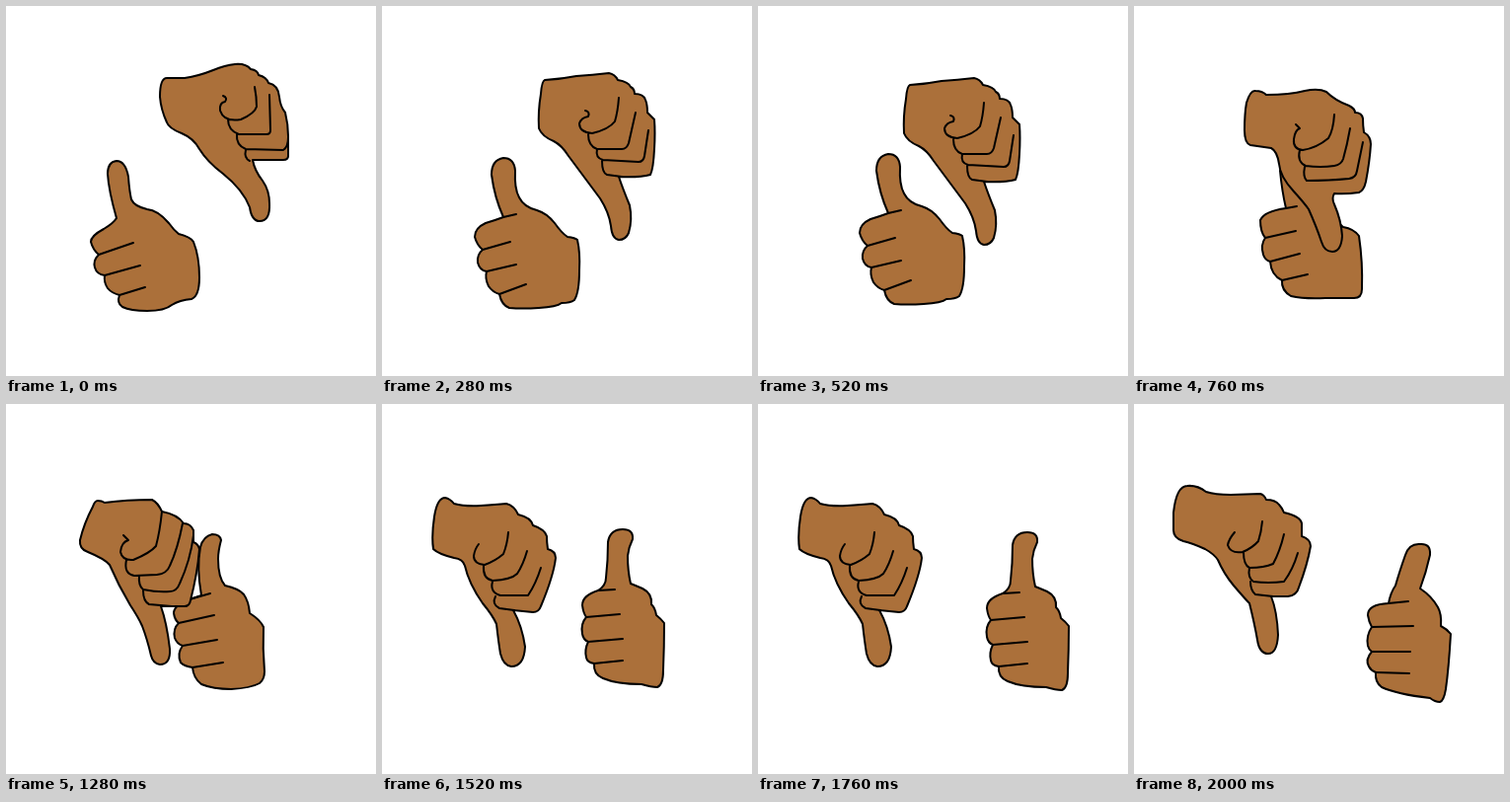
Animation, 375 px wide and 375 px high, one loop 2240 ms. Source, as an HTML page without scripts:

```html
<!DOCTYPE html>
<html lang="en">
<head>
<meta charset="utf-8">
<title>Thumbs up, thumbs down</title>
<style>
html, body { margin: 0; width: 100%; height: 100%; overflow: hidden; background: #fff; }
svg { display: block; width: 100%; height: 100%; }
path { fill: #ab703a; stroke: #000; stroke-width: 2; stroke-linecap: round; stroke-linejoin: round; }
.line { fill: none; }
.pose { visibility: hidden; animation: short 2240ms step-end infinite; animation-delay: calc(var(--at) * 1ms - 2240ms); }
.long { animation-name: long; }
@keyframes short { 0% { visibility: visible; } 10.7143%, 100% { visibility: hidden; } }
@keyframes long { 0% { visibility: visible; } 12.5%, 100% { visibility: hidden; } }
</style>
</head>
<body>
<svg viewBox="0 0 375 375">
<defs>
  <!-- thumbs up -->
  <g id="up1">
    <path d="M112 157Q103 158 103 170Q104 187 112 215Q109 220 99 226Q86 233 86 239Q88 247 94 252Q88 258 90 265Q92 272 100 273Q99 280 103 286Q107 291 115 293Q112 301 118 305Q126 309 143 309Q161 309 168 303Q176 298 188 297Q196 294 196 275Q196 254 190 239Q187 234 175 231Q170 227 165 220Q154 207 143 206Q130 203 127 196Q125 187 124 173Q121 157 112 157Z"/>
    <path class="line" d="M94 252L129 240M100 273L136 263M115 293L141 285"/>
  </g>
  <g id="up2">
    <path d="M132 150Q120 152 120 167Q123 190 132 210Q124 213 114 216Q103 221 103 230Q105 238 111 243Q105 248 106 256Q108 264 115 265Q113 272 117 280Q121 286 128 288Q130 299 138 302Q151 303 168 302Q186 301 191 297Q200 297 204 294Q209 286 209 264Q210 246 207 233Q205 231 197 230Q191 226 184 216Q176 206 166 203Q153 200 148 190Q143 181 144 163Q143 150 132 150Z"/>
    <path class="line" d="M132 210L145 207M111 243L139 235M115 265L145 258M128 288L155 278"/>
  </g>
  <g id="up3">
    <path d="M148 167Q150 188 154 205Q132 208 128 217Q128 229 133 235Q128 242 131 252Q133 258 138 259Q139 273 150 278Q149 288 159 294Q172 297 194 296H223Q231 296 231 287Q232 260 228 233Q223 226 212 224L190 205L165 175Z"/>
    <path class="line" d="M154 205L165 203M133 235L164 228M138 259L168 251M150 278L176 272"/>
  </g>
  <g id="up4">
    <path d="M209 132Q200 134 197 145Q193 166 198 194L186 198Q170 204 170 212Q171 219 175 222Q169 228 171 237Q173 243 179 245Q173 253 177 262Q181 266 189 267Q190 278 198 284Q210 289 228 289Q248 288 257 283Q262 279 262 271Q260 248 261 226Q258 219 247 212Q246 200 241 193Q236 187 222 184Q215 176 215 157Q215 149 218 138Q217 132 209 132Z"/>
    <path class="line" d="M186 198L207 192M175 222L211 214M179 245L214 239M189 267L220 262"/>
  </g>
  <g id="up5">
    <path d="M244 127Q231 127 229 140Q229 159 227 176Q227 184 219 189Q203 194 203 204Q204 212 207 216Q201 223 203 233Q204 239 209 241Q205 249 207 257Q208 262 215 263Q214 274 224 278Q238 284 263 284Q273 287 279 287Q285 285 285 270Q286 246 286 222Q283 218 278 214Q277 207 273 203Q274 192 264 187Q257 184 252 182Q249 169 249 154Q250 145 254 137Q255 127 244 127Z"/>
    <path class="line" d="M219 189L236 188M207 216L241 213M209 241L244 238M215 263L244 260"/>
  </g>
  <g id="up6">
    <path d="M290 142Q279 141 275 153Q269 170 265 184Q260 191 258 202Q237 203 237 214Q238 221 241 226Q235 235 237 245Q238 249 241 251Q234 259 238 266Q240 270 245 272Q244 282 251 287Q266 294 300 298Q305 302 310 302Q314 301 316 289Q319 268 321 233Q317 228 311 225Q312 213 308 206Q302 195 290 187Q296 171 300 153Q301 141 290 142Z"/>
    <path class="line" d="M258 202L278 200M241 226L283 225M241 251H280M245 272L279 273"/>
  </g>

  <!-- thumbs down -->
  <g id="down1">
    <path d="M163 73Q172 73 181 73Q195 71 210 65Q222 60 232 59Q243 58 248 64Q255 65 256 70Q264 72 266 78Q276 80 277 92Q278 102 283 108Q286 120 286 132V152Q286 156 281 156H250Q252 167 260 177Q267 187 267 200Q268 218 257 218Q249 218 247 204Q240 186 220 170Q204 158 196 145Q190 134 178 129Q165 124 163 118Q157 105 156 92Q156 73 163 73Z"/>
    <path class="line" d="M252 82Q254 92 254 102Q252 109 238 115Q221 118 217 106Q216 98 222 97Q225 93 220 91M267 90L268 126Q268 130 264 130H236Q225 126 225 115M234 130Q233 141 243 145L281 146Q286 143 286 133M243 146Q241 154 247 157"/>
  </g>
  <g id="down2">
    <path d="M154 80Q171 79 186 76Q202 75 219 73Q225 74 228 80Q239 82 241 87Q245 89 245 94Q254 94 256 100Q258 105 258 113Q262 117 265 120Q266 133 265 150Q264 170 261 176Q250 179 229 178Q233 190 240 207Q243 222 239 235Q236 242 229 242Q222 241 221 228Q219 214 210 200L178 157Q171 146 163 142Q151 137 148 129Q147 112 150 94Q151 81 154 80Z"/>
    <path class="line" d="M229 98Q228 112 225 122Q219 130 202 134Q189 133 189 124Q191 118 198 117Q200 112 195 111M246 113L239 144Q237 150 232 150H207Q198 147 198 135M259 131L255 157Q254 163 249 163L213 161Q205 159 207 150M212 162Q212 174 217 176L232 178"/>
  </g>
  <g id="down3">
    <path d="M123 86Q130 86 134 90Q158 90 173 86Q187 83 195 87Q204 96 218 101Q224 104 224 108Q231 108 232 114Q232 121 233 128Q240 132 240 140Q239 157 235 178Q233 187 228 189Q214 191 203 190Q200 195 203 201Q210 217 211 233Q210 249 201 249Q193 249 190 239Q185 224 177 206Q172 199 162 188Q148 173 147 160Q145 147 139 144L118 141Q112 139 112 126Q112 109 114 98Q118 85 123 86Z"/>
    <path class="line" d="M203 110Q202 126 197 134Q185 144 171 146Q161 145 162 135Q163 126 168 124L164 120M219 124Q216 141 212 155Q210 161 203 162Q189 164 174 162Q165 158 168 146M232 138L226 167Q225 174 218 175Q198 177 175 177Q171 173 173 163"/>
  </g>
  <g id="down4">
    <path d="M93 98Q97 98 100 100Q122 97 148 97Q154 100 158 109Q174 112 180 121Q187 121 190 128L190 140Q195 142 196 147Q194 172 187 199Q186 205 181 205L157 205Q163 222 166 248Q167 264 156 264Q149 263 147 255Q143 238 138 225Q134 216 126 204Q114 184 105 163Q100 157 83 150Q74 147 75 138Q79 121 88 104Q90 98 93 98Z"/>
    <path class="line" d="M158 109Q156 129 152 144Q146 151 129 158Q118 159 116 150Q117 140 124 138L119 133M179 121Q174 147 166 164Q163 172 153 173L130 174Q119 172 122 158M190 133Q187 158 176 182Q173 190 166 190Q154 191 139 188Q134 184 135 174M139 189Q139 200 145 203L168 205"/>
  </g>
  <g id="down5">
    <path d="M64 95Q69 96 73 101Q84 104 100 103Q115 102 126 101Q134 103 138 112Q151 115 153 123Q165 127 167 134Q167 140 168 147Q176 149 176 156Q174 174 161 205Q159 211 153 211L133 209Q142 225 145 246Q144 266 131 266Q123 265 120 253Q118 241 116 223Q112 214 102 202Q88 182 84 164Q82 157 73 156Q57 152 52 147Q50 134 53 114Q56 95 64 95Z"/>
    <path class="line" d="M128 130Q127 142 123 152Q115 159 104 163Q93 162 93 154Q94 147 98 142M147 149Q143 163 137 172Q131 178 112 179Q102 177 103 164M161 166Q156 182 148 194L120 194Q109 191 112 180M115 195Q111 203 119 207L134 209"/>
  </g>
  <g id="down6">
    <path d="M54 83Q64 82 73 89Q82 92 98 92L128 91Q132 92 134 97Q143 97 147 102Q150 105 152 110Q169 114 170 121L170 134Q179 137 179 144Q176 162 167 186Q165 194 156 195L139 195Q145 210 146 234Q145 253 136 253Q127 253 125 239Q122 222 117 202Q113 198 101 184Q91 172 85 158Q81 152 72 147Q59 141 50 139Q40 136 40 128V110Q43 83 54 83Z"/>
    <path class="line" d="M130 119Q129 130 126 139Q120 146 110 150Q98 152 95 143Q96 137 102 130M152 132Q148 149 141 162Q132 166 117 166Q111 163 111 150M166 151Q161 168 152 180Q136 182 121 180Q115 176 117 166M118 180Q118 189 123 193L141 195"/>
  </g>
</defs>

<g class="pose long" style="--at:0"><use href="#up1"/><use href="#down1"/></g>
<g class="pose" style="--at:280"><use href="#up2" x="-9" y="4"/><use href="#down2" x="11" y="-5"/></g>
<g class="pose" style="--at:520"><use href="#up2"/><use href="#down2"/></g>
<g class="pose" style="--at:760"><use href="#up3"/><use href="#down3"/></g>
<g class="pose long" style="--at:1000"><use href="#up4" x="-7" y="1"/><use href="#down4" x="15" y="-4"/></g>
<g class="pose" style="--at:1280"><use href="#up4"/><use href="#down4"/></g>
<g class="pose" style="--at:1520"><use href="#up5"/><use href="#down5"/></g>
<g class="pose" style="--at:1760"><use href="#up5" x="29" y="3"/><use href="#down5" x="-10"/></g>
<g class="pose" style="--at:2000"><use href="#up6"/><use href="#down6"/></g>
</svg>
</body>
</html>
```
